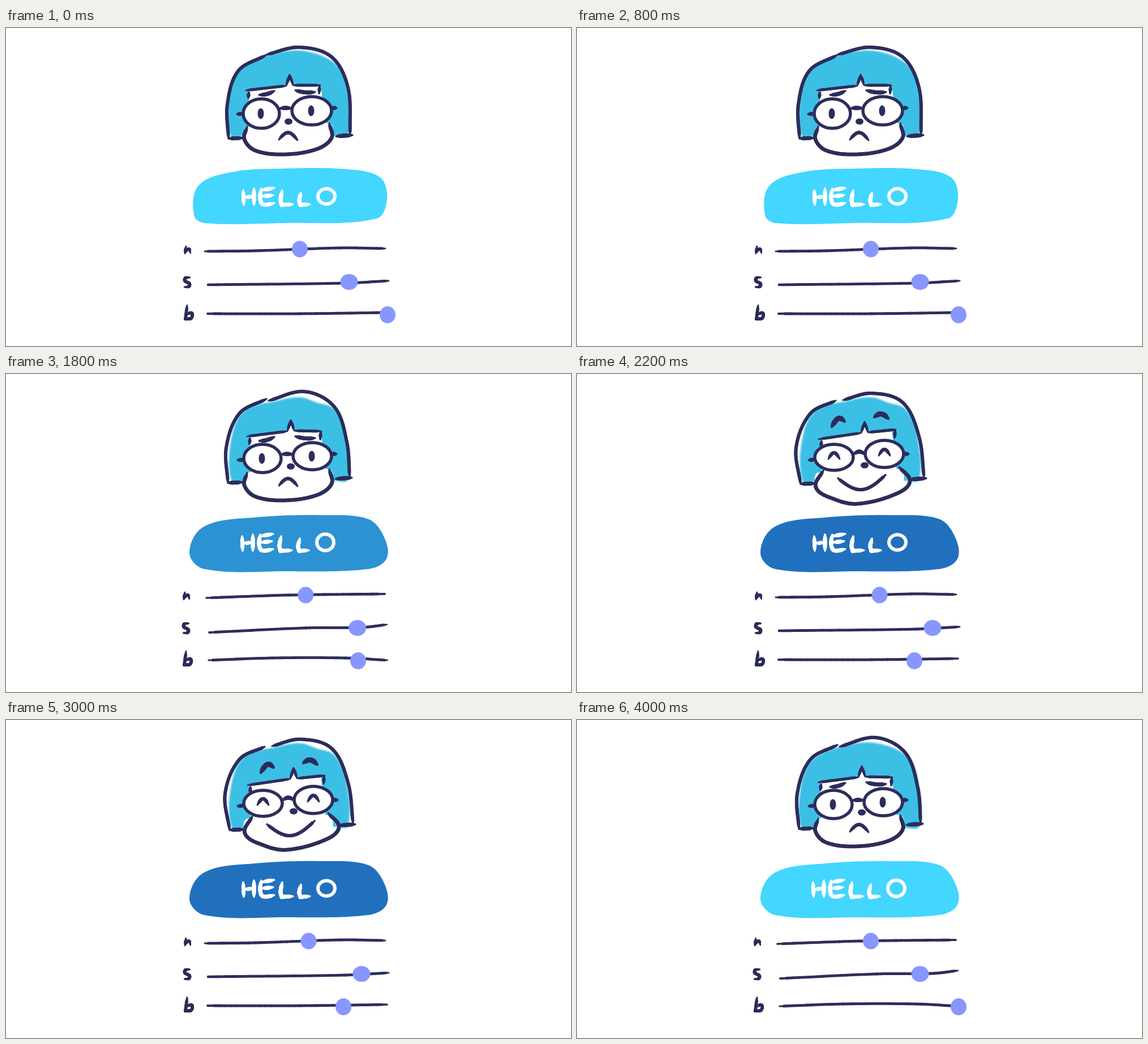
An HTML page with a canvas for the animation above (4200 ms loop, 998 by 561 pixels).

```html
<!DOCTYPE html>
<html lang="en">
<head>
<meta charset="utf-8">
<title>Hello sliders</title>
<style>
html, body { margin: 0; width: 100%; height: 100%; overflow: hidden; background: #fff; }
canvas { display: block; }
</style>
</head>
<body>
<canvas id="stage" width="998" height="561" role="img" aria-label="HELLO button with h, s and b sliders"></canvas>
<script>
const ctx = document.getElementById('stage').getContext('2d');
const INK = '#2d2d5b', HAIR = '#3cbfe5', KNOB = '#8896ff', WHITE = '#fff';
const STEP = 200, COUNT = 21;
const mix = (a, b, k) => a + (b - a) * k;

// Smooth curve through a few points; a repeated point makes a corner
function curve(s, closed) {
  const p = s.split(' ').map(q => q.split(',').map(Number)), n = p.length, out = [];
  const at = i => closed ? p[(i + n) % n] : p[Math.max(0, Math.min(n - 1, i))];
  const slope = (a, b) => {
    const d = Math.hypot(b[0] - a[0], b[1] - a[1]) || 1;
    return [(b[0] - a[0]) / d, (b[1] - a[1]) / d];
  };
  for (let i = 0; i < (closed ? n : n - 1); i++) {
    const a = at(i), b = at(i + 1), d = Math.hypot(b[0] - a[0], b[1] - a[1]);
    const u = slope(at(i - 1), b), v = slope(a, at(i + 2));
    for (let k = 0; k < 16; k++) {
      const t = k / 16, r = 1 - t;
      out.push([0, 1].map(j => r * r * (1 + 2 * t) * a[j] + t * t * (3 - 2 * t) * b[j] +
        d * t * r * (r * u[j] - t * v[j])));
    }
  }
  if (!closed) out.push(p[n - 1]);
  return out;
}

const arch = (x1, y1, x2, y2, rise) => Array.from({ length: 21 }, (_, i) =>
  [mix(x1, x2, i / 20), mix(y1, y2, i / 20) - rise * Math.sin(Math.PI * i / 20)]);
const dash = (...ends) => arch(...ends, 0);

function blob(s, color) {
  ctx.fillStyle = color;
  ctx.beginPath();
  for (const q of curve(s, true)) ctx.lineTo(...q);
  ctx.fill();
}

// Brush stroke, thinner at both tips
function ink(path, w, color = INK) {
  const p = typeof path === 'string' ? curve(path) : path, len = [0];
  for (let i = 1; i < p.length; i++)
    len.push(len[i - 1] + Math.hypot(p[i][0] - p[i - 1][0], p[i][1] - p[i - 1][1]));
  const total = len[len.length - 1], reach = Math.min(8, total / 2);
  ctx.strokeStyle = color;
  ctx.lineCap = 'round';
  for (let i = 1; i < p.length; i++) {
    const mid = (len[i] + len[i - 1]) / 2;
    ctx.lineWidth = w * mix(.4, 1, Math.min(1, Math.min(mid, total - mid) / reach));
    ctx.beginPath();
    ctx.moveTo(...p[i - 1]);
    ctx.lineTo(...p[i]);
    ctx.stroke();
  }
}

function oval(x, y, rx, ry, fill, w, color = INK) {
  ctx.beginPath();
  ctx.ellipse(x, y, rx, ry, 0, 0, 7);
  ctx.fillStyle = fill;
  ctx.fill();
  ctx.lineWidth = w;
  ctx.strokeStyle = color;
  if (w) ctx.stroke();
}

// Hair outline, fringe (left end, tip, right end), glasses and nose
const looks = [
  { left: '393,195 391,135 410,76 459,48', right: '460,47 518,34 575,51 604,105 608,187',
    fringe: [424, 110, 501, 82, 555, 101], lens: [[451, 151, 32, 26], [540, 146, 35, 25]], nose: [499, 165] },
  { left: '392,192 389,130 412,70 460,44', right: '464,47 528,31 580,58 602,120 607,181',
    fringe: [426, 110, 503, 81, 557, 101], lens: [[453, 149, 33, 25], [541, 145, 34, 24]], nose: [503, 163] },
  { left: '395,194 387,130 412,70 457,47', right: '470,46 520,34 575,50 604,110 613,182',
    fringe: [427, 115, 508, 84, 563, 98], lens: [[454, 147, 34, 23], [543, 141, 34, 24]], nose: [508, 161] }
];
const hairFill = [
  '397,190 395,120 415,71 470,46 530,41 585,66 603,110 605,187 577,190 421,190',
  '399,190 397,120 420,66 480,47 520,41 548,50 580,62 600,105 604,186 577,188 421,190'
];
const jaw = {
  sad: '426,174 421,196 440,216 490,223 548,214 575,194 571,168',
  glad: '435,170 422,200 455,221 495,229 560,213 588,190 569,164'
};

function face(look, glad, fill) {
  const [x1, y1, tx, ty, x2, y2] = look.fringe, [l, r] = look.lens;
  ctx.filter = 'blur(1.5px)';
  blob(fill, HAIR);
  ctx.filter = 'none';
  blob(jaw.sad, WHITE);
  ctx.fillStyle = WHITE;
  ctx.beginPath();
  [[x1 + 4, y1], [tx - 6, ty + 20], [tx, ty], [tx + 6, ty + 20], [556, y2], [565, 175], [432, 178]]
    .forEach(q => ctx.lineTo(...q));
  ctx.fill();

  const start = curve(look.left)[0], end = curve(look.right).pop();
  ink(look.left, 6);
  ink(look.right, 6);
  ink(dash(start[0], start[1], start[0] + 25, start[1] - 1), 7);
  ink(dash(end[0] - 25, end[1] + 4, end[0] + 4, end[1] + 2), 7);
  ink(glad ? jaw.glad : jaw.sad, 6.5);

  ink(dash(x1, y1, tx - 6, ty + 20), 5);
  ink(dash(tx - 6, ty + 20, tx, ty), 5);
  ink(dash(tx, ty, tx + 6, ty + 19), 5);
  ink(dash(tx + 6, ty + 19, x2, y2), 5);
  ink(dash(x1 + 5, y1 + 3, x1 + 4, y1 + 14), 6);
  ink(dash(x2 - 1, y2, x2 - 2, y2 + 15), 6);

  for (const q of look.lens) oval(...q, WHITE, 5.5);
  ink(arch(l[0] + l[2], 142, r[0] - r[2], 142, glad ? 5 : 1), 7);
  ink(dash(l[0] - l[2] - 11, 152, l[0] - l[2], 151), 7);
  ink(dash(r[0] + r[2], 141, r[0] + r[2] + 9, 141), 7);
  oval(...look.nose, 7, 5.5, INK);

  if (glad) {
    ink(arch(450, 93, 473, 84, 10), 9);
    ink(arch(525, 76, 550, 79, 7), 9);
    for (const [x, y] of look.lens) ink(arch(x - 10, y + 3, x + 10, y + 3, 11), 6);
    ink(arch(461, 184, 545, 178, -23), 6);
  } else {
    ink(arch(447, 118, 474, 111, -2), 7);
    ink(arch(511, 110, 546, 113, -2), 7);
    for (const [x, y] of look.lens) oval(x - 1, y, 5.5, 9.5, INK);
    ink(arch(482, 197, 515, 198, 13), 6);
  }
}

const button = [
  '332,330 340,278 400,254 490,248 600,249 660,263 673,300 655,336 490,344 350,344',
  '324,315 350,269 440,253 560,249 640,256 668,288 672,326 640,344 490,348 350,344'
];
const word = [
  '419,286 420,312', '438,283 438,312', '421,299 437,297',
  '451,283 449,300 454,311 474,309', '452,286 474,282', '452,297 472,295',
  '488,286 485,303 487,312 487,312 507,311', '521,290 518,304 520,312 520,312 537,311'
];
const labels = [
  '318,385 316,398', '317,396 323,390 326,397',
  '325,440 317,441 316,446 324,451 323,456 315,457',
  '320,489 317,513 317,513 327,512 328,503 318,506'
];
const tracks = [
  ['351,394 440,393 590,388 670,389', '357,453 600,450 676,446', '356,504 520,504 673,502'],
  ['354,395 500,390 669,388', '359,456 530,448 630,447 673,442', '358,505 470,501 600,501 674,505']
];

function draw(i) {
  const k = i < 11 ? Math.max(0, i - 7) / 3 : Math.min(1, (20 - i) / 3);
  const pose = i === 20 ? 1 : i % 2;
  const line = i < 8 ? i % 2 : i < 11 ? 1 : (i + 1) % 2;
  const glad = i > 9 && i < 20;
  const rgb = [mix(67, 33, k), mix(214, 112, k), mix(255, 190, k)].map(Math.round);

  ctx.fillStyle = WHITE;
  ctx.fillRect(0, 0, 998, 561);
  face(looks[glad && pose ? 2 : pose], glad, hairFill[i % 2]);
  blob(button[pose], `rgb(${rgb})`);

  // The lettering boils by a small sideways shift
  ctx.save();
  ctx.translate(-2 * line, 0);
  word.forEach(s => ink(s, 7, WHITE));
  oval(566, 297, 15, 13.5 + line, 'transparent', 6, WHITE);
  labels.forEach(s => ink(s, 5.5));
  ctx.restore();

  tracks[line].forEach(s => ink(s, 4.8));
  oval(mix(519, 534.5, k), 390, 14, 14.5, KNOB);
  oval(mix(606, 628, k), 448, 15.5, 14, KNOB);
  oval(mix(674, 596, k), 506, 14, 15, KNOB);
}

const start = performance.now();
function tick() {
  draw(Math.floor((performance.now() - start) / STEP) % COUNT);
  requestAnimationFrame(tick);
}
tick();
</script>
</body>
</html>
```
